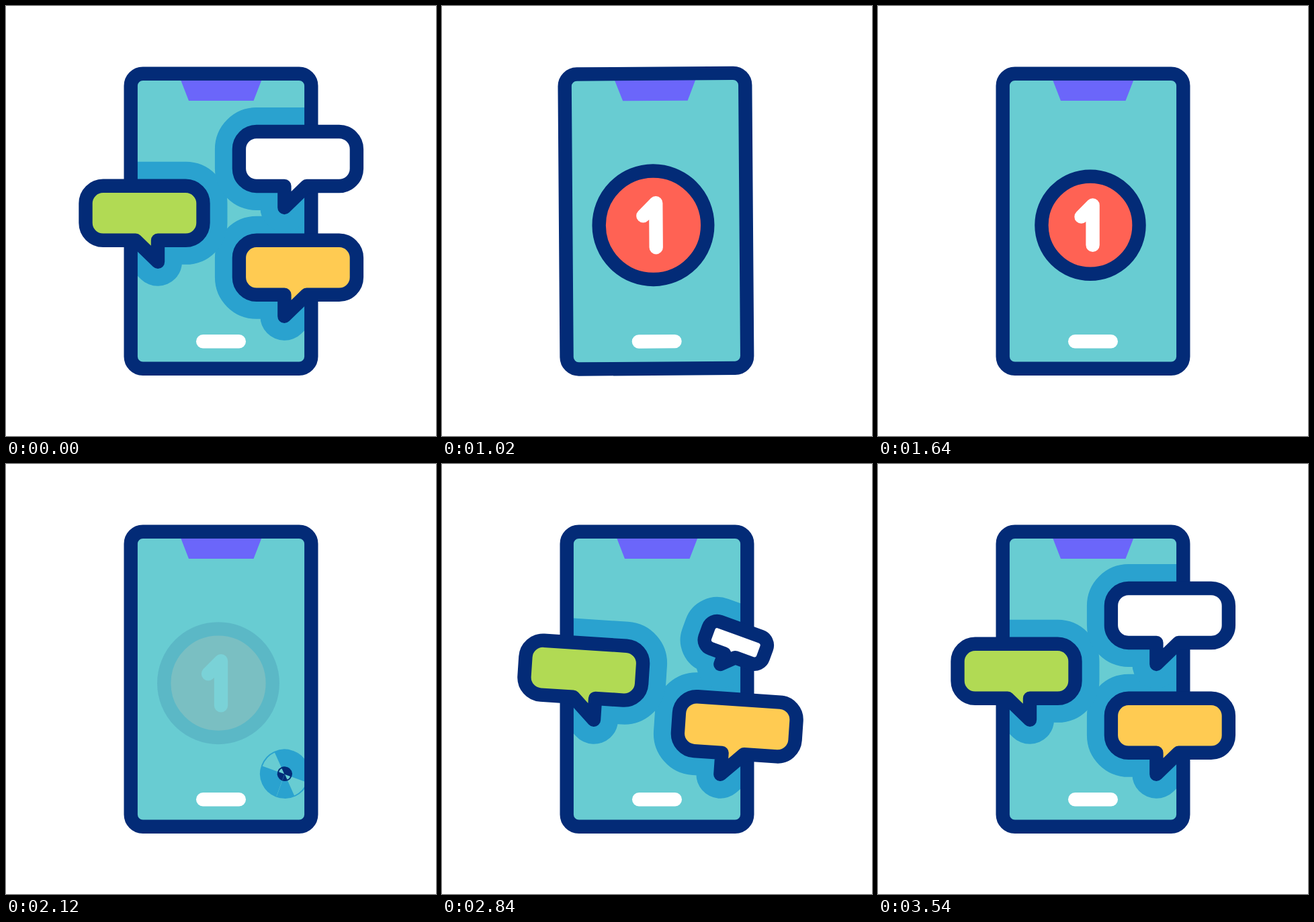
An HTML page for the animation above (3.6 s loop, 640 px wide and 640 px high).

```html
<!DOCTYPE html>
<html lang="en">
<head>
<meta charset="utf-8">
<title>Phone messages</title>
<style>
  html, body { margin: 0; width: 100%; height: 100%; overflow: hidden; background: #fff; }
  svg { display: block; width: 640px; height: 640px; }
  path, circle { vector-effect: non-scaling-stroke; stroke-width: 20.4; stroke-linecap: round; stroke-linejoin: round; }
  .line { stroke: #032b77; }
  .halo path { fill: #2aa2cf; stroke: #2aa2cf; stroke-width: 72; }
</style>
</head>
<body>
<svg viewBox="0 0 640 640">
  <defs>
    <clipPath id="screen"><rect x="185.5" y="100.5" width="269" height="439.5" rx="18"/></clipPath>
  </defs>
  <g id="phone">
    <rect x="185.5" y="100.5" width="269" height="439.5" rx="18" fill="#68ccd2"/>
    <polygon points="260,110 380.5,110 368.5,141 272,141" fill="#6b66fa"/>
    <g id="halos" class="halo" clip-path="url(#screen)"></g>
    <path d="M293.2 499.3H346.8" stroke="#fff"/>
    <rect class="line" x="185.7" y="100.7" width="268.6" height="439" rx="18" fill="none" stroke-width="20.4"/>
    <g id="badge">
      <circle r="80.8" fill="#ff6254"/>
      <path d="M-15-14 4-33V33" fill="none" stroke="#fff"/>
      <circle class="line" r="80.8" fill="none"/>
    </g>
  </g>
  <g id="bodies"></g>
</svg>
<script>
const LOOP = 3600;
const $ = id => document.getElementById(id);
const BUBBLE = 'M-41.5-113H81.5a26 26 0 0 1 26 26v29a26 26 0 0 1-26 26H33L0 0V-32H-41.5a26 26 0 0 1-26-26v-29a26 26 0 0 1 26-26z';

// Each bubble turns and scales around the tip of its tail.
const bubbles = [
  { x: 414.4, y: 461.8, flip: 1, color: '#ffcb52', leave: 0, enter: 2120, lift: 0 },
  { x: 226, y: 380.8, flip: -1, color: '#b1da54', leave: 130, enter: 2480, lift: 0 },
  { x: 414.4, y: 300, flip: 1, color: '#fff', leave: 260, enter: 2790, lift: 2 }
];

function addPath(parent, attributes) {
  const path = document.createElementNS('http://www.w3.org/2000/svg', 'path');
  path.setAttribute('d', BUBBLE);
  for (const name in attributes) path.setAttribute(name, attributes[name]);
  return parent.appendChild(path);
}

for (const b of bubbles) {
  b.parts = [addPath($('halos'), {}), addPath($('bodies'), { class: 'line', fill: b.color })];
}

const clamp = v => Math.min(1, Math.max(0, v));
const easeOut = v => Math.sin(clamp(v) * Math.PI / 2);
const easeIn = v => 1 - Math.cos(clamp(v) * Math.PI / 2);

// Linear track through [time, value] keys.
function track(t, keys) {
  if (t <= keys[0][0]) return keys[0][1];
  for (let i = 1; i < keys.length; i++) {
    const [t0, v0] = keys[i - 1], [t1, v1] = keys[i];
    if (t < t1) return v0 + (v1 - v0) * (t - t0) / (t1 - t0);
  }
  return keys[keys.length - 1][1];
}

function place(node, scale, transform) {
  node.style.display = scale > 0.005 ? '' : 'none';
  node.setAttribute('transform', transform);
}

function drawBubble(b, t) {
  const entering = t > 1000;
  const age = t - b.enter;
  const scale = entering ? easeOut(age / 145) : 1 - easeIn((t - b.leave) / 240);
  const angle = entering ? track(age, [[300, 20], [450, -20], [600, 20], [750, 0]]) : 0;
  const y = b.y - (entering ? b.lift : 0);
  const transform = `translate(${b.x} ${y}) rotate(${angle}) scale(${scale * b.flip} ${scale})`;
  for (const part of b.parts) place(part, scale, transform);
}

function draw(t) {
  const tilt = track(t, [[990, 0], [1140, -2], [1290, 2], [1440, -2], [1590, 0]]);
  $('phone').setAttribute('transform', `rotate(${tilt} 320 540)`);

  const pulse = track(t, [[1590, 1], [1690, 0.8], [1790, 1]]);
  const opacity = track(t, [[1980, 1], [2140, 0]]);
  const scale = opacity > 0 ? easeOut((t - 495) / 160) * pulse : 0;
  place($('badge'), scale, `translate(316 326.2) scale(${scale})`);
  $('badge').setAttribute('opacity', opacity);

  for (const b of bubbles) drawBubble(b, t);
}

function tick() {
  draw(performance.now() % LOOP);
  requestAnimationFrame(tick);
}
tick();
</script>
</body>
</html>
```
